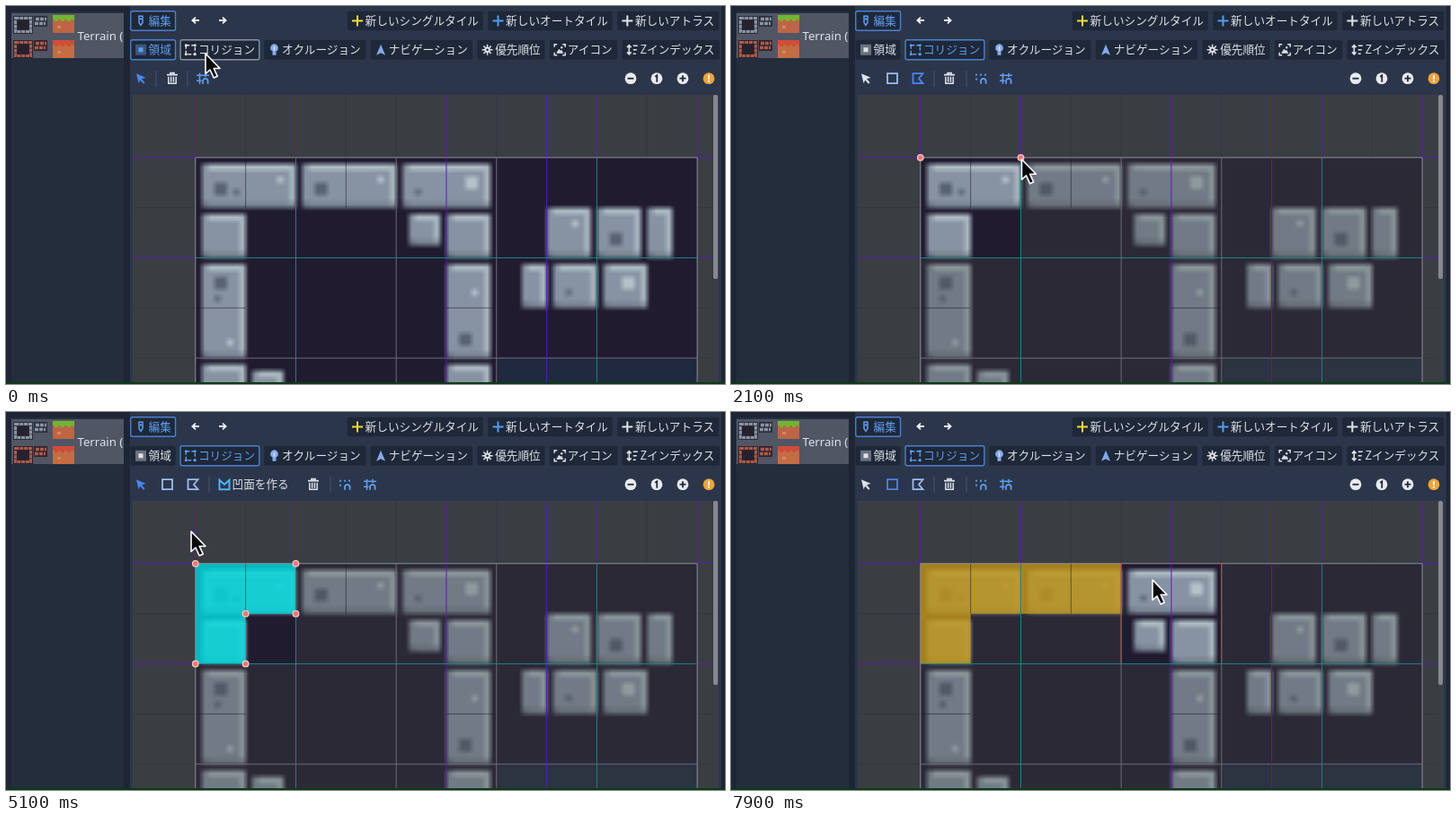
An HTML page with a canvas that plays this animation: 800x421 px, repeating every 8000 ms.

```html
<!DOCTYPE html>
<html lang="ja">
<head>
<meta charset="utf-8">
<title>Tile collision editor</title>
<style>
html, body { margin: 0; width: 100%; height: 100%; overflow: hidden; background: #1e2635; }
canvas, svg { position: absolute; left: 0; top: 0; width: 800px; height: 421px; display: block; }
text { font: 500 12.65px "Noto Sans CJK JP", "Noto Sans CJK", sans-serif; white-space: pre; }
.name { font: 400 13.2px "Noto Sans", sans-serif; }
</style>
</head>
<body>
<canvas id="art" width="800" height="421"></canvas>
<svg id="ui" viewBox="0 0 800 421"></svg>
<script>
const LOOP = 8000, STEP = 100;
const X0 = 210.8, Y0 = 168.8, CELL = 55.83, BOTTOM = 419;
const WHITE = '#dde2ea', BLUE = '#5f9df0', ACTIVE = '#4a86f3', EDGE = '#4b80cf', DARK = '#1e2838';
const gx = i => X0 + i * CELL, gy = j => Y0 + j * CELL;

// ---- tile sheet: one art pixel is an eighth of a cell
function paintSheet() {
  const sheet = document.createElement('canvas');
  sheet.width = 80; sheet.height = 40;
  const s = sheet.getContext('2d');
  const box = (c, x, y, w, h = w) => { s.fillStyle = c; s.fillRect(x, y, w, h); };
  const dent = (x, y, n) => box(n > 1 ? '#596273' : '#626c7d', x, y, n);

  // dent and glint are rows below the brick's top edge
  function brick(x, y, w, h, { dent: d, small = 2, glint, size = 1 } = {}) {
    box('#8793a3', x, y, w, h);
    box('#7a8592', x, y + h - 1, w, 1);
    box('#b0bfc7', x, y, w, 1);
    box('#a9b8c1', x + w - 1, y, 1, h);
    const dim = 'rgba(90,100,118,.45)';
    box(dim, x, y, 1);
    box(dim, x, y + h - 1, 1);
    box(dim, x + w - 1, y + h - 1, 1);
    if (d) dent(x + 2, y + d, small);
    if (glint) box('#b4c3ca', x + w - 2 - size, y + glint, size);
  }

  box('#211b30', 0, 0, 80, 40);
  box('#202a3e', 48, 32, 32, 8);
  for (const x of [1, 17]) brick(x, 1, 15, 7, { dent: 3, glint: 2 });
  brick(33, 1, 14, 7, { dent: 4, small: 1, glint: 2, size: 2 });
  for (const x of [1, 40]) { brick(x, 9, 7, 7); brick(x, 33, 7, 7); }
  brick(1, 17, 7, 15, { dent: 2, glint: 12 });
  brick(40, 17, 7, 15, { dent: 11, glint: 4 });
  brick(34, 9, 5, 5);
  brick(9, 34, 5, 6);
  dent(6, 5, 1);
  dent(3, 22, 1);
  brick(56, 8, 7, 8, { glint: 2 });
  brick(64, 8, 7, 8, { dent: 4 });
  brick(72, 8, 4, 8);
  brick(52, 17, 4, 7);
  brick(57, 17, 7, 7, { dent: 4, small: 1 });
  brick(65, 17, 7, 7, { glint: 2, size: 2 });
  return sheet;
}

function paintArt() {
  const g = document.getElementById('art').getContext('2d');
  const fill = (c, x, y, w, h) => { g.fillStyle = c; g.fillRect(x, y, w, h); };
  fill('#242d3c', 6, 6, 125, 414);
  fill('#2b364a', 138, 0, 658, 421);
  fill('#3a3e43', 141, 99, 652, 322);
  g.drawImage(paintSheet(), X0, Y0, CELL * 10, CELL * 5);
  fill('#0b3a16', 0, BOTTOM, 800, 2);
}

// ---- markup helpers
const rect = (x, y, w, h, c, more = '') =>
  `<rect x="${x}" y="${y}" width="${w}" height="${h}" fill="${c}" ${more}/>`;
const vline = (x, a, b, c) => rect(x - .5, a, 1, b - a, c);
const hline = (y, a, b, c) => rect(a, y - .5, b - a, 1, c);
const line = (d, c, w = 1.6, dash = 'none') =>
  `<path d="${d}" fill="none" stroke="${c}" stroke-width="${w}" stroke-dasharray="${dash}"/>`;
const area = (d, c, more = '') => `<path d="${d}" fill="${c}" ${more}/>`;
const dot = (x, y, r, c) => `<circle cx="${x}" cy="${y}" r="${r}" fill="${c}"/>`;
const label = (x, y, s, c = WHITE) => `<text x="${x}" y="${y}" fill="${c}">${s}</text>`;
const at = (x, y, s) => `<g transform="translate(${x} ${y})">${s}</g>`;
// shown while the time lies in one of the [on, off) pairs
const during = (spans, s) => `<g data-spans="${spans}">${s}</g>`;
const others = spans => [0, ...spans, LOOP];

// ---- icons, drawn around their centre
const icon = {
  pencil: c => line('M-2 -5.2H2V2L0 5L-2 2Z', c, 1.5) + rect(-1, -3, 2, 2, c),
  plus: c => line('M-6 0H6M0 -6V6', c, 2),
  back: c => line('M4 0H-3M0 -3.4L-3.6 0L0 3.4', c, 1.8),
  next: c => `<g transform="scale(-1 1)">${icon.back(c)}</g>`,
  region: c => rect(-6, -6, 12, 12, c, 'opacity=".4"') + rect(-2.5, -2.5, 5, 5, c),
  collide: c => line('M-5 -5H5V5H-5Z', c, 1.4, '4 2') +
    [-5, 5].map(x => dot(x, -5, 1.5, c) + dot(x, 5, 1.5, c)).join(''),
  bulb: () => dot(0, -2, 4.4, '#86a9ee') + rect(-2, 2, 4, 4, '#86a9ee') + rect(-.7, -4, 1.5, 5, '#dbe6ff'),
  nav: () => area('M0 -6L5 6L0 3.5L-5 6Z', '#86a9ee'),
  sun: c => line('M0 -6V6M-6 0H6M-4.2 -4.2L4.2 4.2M4.2 -4.2L-4.2 4.2', c, 1.5) + dot(0, 0, 3.2, c) + dot(0, 0, 1.3, DARK),
  image: c => line('M-6 -3V-6H-3M3 -6H6V-3M6 3V6H3M-3 6H-6V3', c, 1.5) + area('M-4 4L-1 -1L1 1L2 0L4 4Z', c) + dot(2, -2.5, 1.2, c),
  zorder: c => line('M-3.5 -5V5M-5.8 -2.6L-3.5 -5L-1.2 -2.6M-5.8 2.6L-3.5 5L-1.2 2.6M1 -4.5H6M1 0H5M1 4.5H4', c),
  select: c => area('M-5 -5.5L5.5 -1L1 .6L4.5 4.5L3 6L-.8 1.8L-2.4 5.5Z', c),
  box: c => line('M-5.5 -5.5H5.5V5.5H-5.5Z', c, 1.8),
  poly: c => line('M-5.5 -5.5H5.5L1 0L5.5 5.5H-5.5Z', c, 1.8),
  concave: c => line('M-5.5 5.5V-5L0 0L5.5 -5V5.5Z', c, 2),
  trash: c => line('M-6 -4H6M-2 -4V-6H2V-4', c, 1.7) + line('M-4.2 -2V5.5H4.2V-2M-1.4 -2V4M1.4 -2V4', c, 1.5),
  magnet: c => line('M0 6V3A2.7 2.7 0 0 1 5.6 3V6', c, 1.8),
  snapHalf: c => dot(-5, -4, 1.1, c) + dot(0, -4, 1.1, c) + dot(5, -4, 1.1, c) + dot(-5, 1, 1.1, c) + icon.magnet(c),
  snapGrid: c => line('M-3.5 -6V6M3 -6V-1.5M-7 -3.5H7M-7 2.5H-1.5', c) + icon.magnet(c)
};

// ---- timeline of the editing session
const TAB = 200, POLY = 1200, CLICK = 1800, GAP = 300, CLOSE = 4200;
const PICK2 = 5500, BOX = 5900, DRAWN = 6500, PICK3 = 7000, BOX2 = 7500;
const TOOLS = { select: [0, POLY, CLOSE, BOX, DRAWN, BOX2], poly: [POLY, CLOSE], box: [BOX, DRAWN, BOX2, LOOP] };
const CONCAVE = [CLOSE, PICK2, DRAWN, PICK3];

// cell corners in click order
const ELL = [[0, 0], [2, 0], [2, 1], [1, 1], [1, 2], [0, 2]];
const BAR = [[2, 0], [4, 0], [4, 1], [2, 1]];
const outline = corners => 'M' + corners.map(([i, j]) => `${gx(i)} ${gy(j)}`).join('L') + 'Z';

const corner = (t, [i, j]) => [t, gx(i) + 1, gy(j) + 2];
const clicks = ELL.map((p, k) => corner(CLICK + GAP * k, p));
const MOVES = [
  [0, 222, 53], [500, 222, 53], [POLY, 208, 84], [1400, 208, 84],
  ...clicks, [2900, 276, 284], corner(3600, ELL[5]), corner(4000, ELL[0]), corner(4700, ELL[0]),
  [5100, 206, 133], [PICK2, 370, 200], [BOX, 182, 82], corner(6200, BAR[0]), [DRAWN, 423, 217],
  [6700, 446, 220], [PICK3, 500, 225], [BOX2, 182, 72], [7900, 469, 187], [LOOP + 1, 469, 187]
].sort((a, b) => a[0] - b[0]);

// ---- panels
function sidebar() {
  const wall = (y, c, back) => rect(8, y, 22, 20, back) + line(`M10.5 ${y + 2.5}H27.5V${y + 17.5}H10.5Z`, c, 3, '4 .8') +
    rect(13, y + 5, 12, 10, '#25222f') + rect(31, y, 15, 12, back) +
    line(`M33 ${y + 3.5}H45M32 ${y + 8.5}H44`, c, 3.4, '4 1');
  const ground = (y, top, body) => rect(52, y, 24, 20, body) + rect(52, y, 24, 5, top) +
    line(`M54 ${y + 6}H76`, top, 2, '4 3') + rect(57, y + 12, 4, 3, '#d98658');
  return rect(6, 8, 125, 50, '#505663') +
    wall(11, '#8a94a2', '#2c2d3c') + wall(38, '#a85c4c', '#33212b') +
    ground(10, '#72b52f', '#bd6545') + ground(38, '#cf4d37', '#c46c43') +
    '<svg width="131" height="60"><text class="name" x="79.5" y="38" fill="#dde2ea">Terrain (</text></svg>';
}

// buttons in a row, each as wide as its text
function row(x, y, h, items) {
  return items.map(([glyph, text, tint = WHITE, edge = 'none']) => {
    const w = text.replace('Z', '').length * 12.65 + (text[0] == 'Z' ? 8 : 0) + 26;
    const s = rect(x + .75, y + .75, w - 1.5, h - 1.5, DARK, `rx="2" stroke="${edge}" stroke-width="1.4"`) +
      at(x + 12, y + h / 2, glyph) + label(x + 20.6, y + h / 2 + 4.4, text, tint);
    x += w + 4;
    return s;
  }).join('');
}

function header() {
  const region = (...look) => [icon.region(look[0] || WHITE), '領域', ...look];
  const collide = (...look) => [icon.collide(look[0] || WHITE), 'コリジョン', ...look];
  return row(138, 5, 23, [[icon.pencil(BLUE), '編集', BLUE, EDGE]]) +
    at(211, 16, icon.back('#f0f2f5')) + at(241, 16, icon.next('#f0f2f5')) +
    row(379, 5, 23, [
      [icon.plus('#f4d83a'), '新しいシングルタイル'],
      [icon.plus('#4f9df5'), '新しいオートタイル'],
      [icon.plus(WHITE), '新しいアトラス']]) +
    during([0, TAB], row(138, 37, 23.5, [region(BLUE, EDGE), collide(WHITE, '#8792a6')])) +
    during([TAB, LOOP], row(138, 37, 23.5, [region(), collide(BLUE, EDGE)])) +
    row(286.5, 37, 23.5, [
      [icon.bulb(), 'オクルージョン'], [icon.nav(), 'ナビゲーション'], [icon.sun(WHITE), '優先順位'],
      [icon.image(WHITE), 'アイコン'], [icon.zorder(WHITE), 'Zインデックス']]);
}

function toolbar() {
  const Y = 80.7, sep = x => vline(x, 72, 90, '#46536a');
  const tool = (x, name, idle) => at(x, Y,
    during(TOOLS[name], icon[name](ACTIVE)) + during(others(TOOLS[name]), icon[name](idle)));
  const tail = x => at(x, Y, icon.trash(WHITE)) + sep(x + 19) +
    at(x + 35, Y, icon.snapHalf(BLUE)) + at(x + 63, Y, icon.snapGrid(BLUE));
  const signs = ['M-3.5 0H3.5', 'M-1.7 -2L.3 -3.5V4', 'M-3.5 0H3.5M0 -3.5V3.5', 'M0 -4V1M0 2V4'];
  return tool(150, 'select', WHITE) +
    during([0, TAB], sep(167) + at(185, Y, icon.trash(WHITE)) + sep(202) + at(219, Y, icon.snapGrid(BLUE))) +
    during([TAB, LOOP], tool(179.5, 'box', '#9dbcf5') + tool(208, 'poly', '#9dbcf5') + sep(226) +
      during(CONCAVE, at(243, Y, icon.concave('#4fb4f5')) + label(251.5, 85, '凹面を作る') + tail(342)) +
      during(others(CONCAVE), tail(243))) +
    signs.map((d, k) => at(695 + 29 * k, Y, dot(0, 0, 6.4, k < 3 ? '#e8ebef' : '#f2a33c') +
      line(d, k < 3 ? DARK : '#fff', 1.8))).join('');
}

function stage() {
  const left = gx(0), right = gx(10), top = gy(0), base = gy(2);
  const shade = (spans, i) => during(spans, area(
    `M${left} ${top}H${right}V${BOTTOM}H${left}ZM${gx(i)} ${top}V${base}H${gx(i + 2)}V${top}Z`,
    '#454646', 'fill-opacity=".33" fill-rule="evenodd"'));
  // a finished polygon is cyan while its tile is selected, then golden
  const shape = (on, off, corners) =>
    during([on, off], area(outline(corners), '#00d8dc', 'fill-opacity=".84"')) +
    during([off, LOOP], area(outline(corners), '#cc9e14', 'fill-opacity=".75"'));
  let s = shade([TAB, PICK2], 0) + shade([PICK2, PICK3], 2) + shade([PICK3, LOOP], 4) +
    shape(CLOSE, PICK2, ELL) + shape(DRAWN, PICK3, BAR);

  const purple = '#5b1bb0', teal = '#17877f', grey = '#6c6a78', rim = '#8d8d98', faint = '#34383c';
  for (let i = 0; i <= 10; i++) s += vline(gx(i), 99, top, [0, 2, 5, 7, 8, 10].includes(i) ? purple : faint);
  for (let j = 0; j <= 4; j++) {
    const c = j == 0 || j == 2 ? purple : faint;
    s += hline(gy(j), 141, left, c) + hline(gy(j), right, 787, c);
  }
  const cut = 'rgba(20,20,32,.5)';
  for (const i of [1, 3]) s += vline(gx(i), top, gy(1), cut);
  for (const i of [0, 5]) s += hline(gy(3), gx(i), gx(i + 1), cut);
  for (const i of [4, 6]) s += vline(gx(i), top, BOTTOM, grey);
  s += hline(gy(4), left, right, grey) + hline(top, left, right, rim);
  for (const i of [0, 10]) s += vline(gx(i), top, BOTTOM, rim);
  for (const i of [5, 7]) s += vline(gx(i), top, BOTTOM, purple);
  for (const i of [2, 8]) s += vline(gx(i), top, BOTTOM, teal);

  const red = '#d83a3c';
  s += during([PICK2, DRAWN, PICK3, LOOP], vline(gx(4), top, base, red)) +
    during([DRAWN, PICK3], vline(gx(4), gy(1), base, red)) +
    during([PICK3, LOOP], vline(gx(6), top, base, red));
  s += hline(base, left, right, teal) + rect(787, 99, 5, 205, '#85888d', 'rx="2"');

  const handle = ([i, j], on, off) => during([on, off], dot(gx(i), gy(j), 3.9, '#f6d5d3') + dot(gx(i), gy(j), 2.8, '#fb7474'));
  ELL.forEach((p, k) => s += handle(p, CLICK + GAP * k, PICK2));
  BAR.forEach(p => s += handle(p, DRAWN, PICK3));
  return s;
}

const POINTER = '<path id="cursor" d="M0 0V22.5L5 18L9.2 27L13.2 25.2L9.2 16.5H16Z" fill="#08090c" stroke="#fff" stroke-width="1.6" stroke-linejoin="round"/>';

paintArt();
const ui = document.getElementById('ui');
ui.innerHTML = sidebar() + header() + toolbar() + stage() + POINTER;
const cursor = document.getElementById('cursor');
const timed = [...ui.querySelectorAll('[data-spans]')].map(el => [el, el.dataset.spans.split(',').map(Number)]);

function show(t) {
  for (const [el, spans] of timed) {
    const on = spans.some((a, k) => k % 2 == 0 && t >= a && t < spans[k + 1]);
    el.style.display = on ? '' : 'none';
  }
  const k = MOVES.findIndex(m => m[0] > t);
  const [t0, x0, y0] = MOVES[k - 1], [t1, x1, y1] = MOVES[k];
  const p = (t - t0) / (t1 - t0), e = p * p * (3 - 2 * p);
  cursor.setAttribute('transform', `translate(${x0 + (x1 - x0) * e} ${y0 + (y1 - y0) * e})`);
}

const start = performance.now();
function tick() {
  const t = (performance.now() - start) % LOOP;
  show(Math.floor(t / STEP) * STEP);
  requestAnimationFrame(tick);
}
show(0);
requestAnimationFrame(tick);
</script>
</body>
</html>
```
